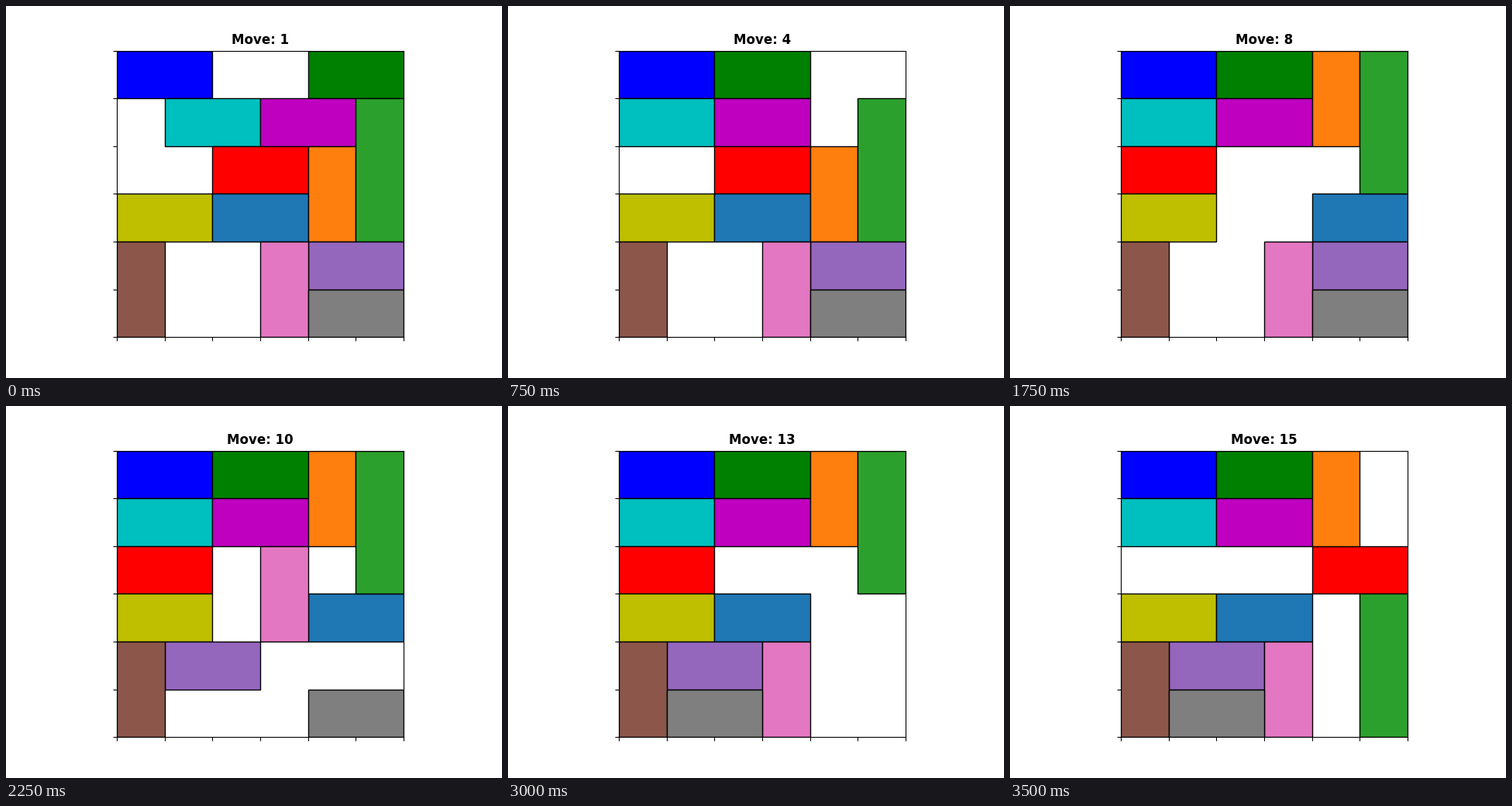
Write a matplotlib script that moves like this. It is 640 by 480 pixels and loops after 3.75 s.

```python
import matplotlib.pyplot as plt
from matplotlib.animation import FuncAnimation
from matplotlib.patches import Rectangle

SIZE = 6

# name: (column, row, width, height, colour), with row 0 at the top
BLOCKS = {
    "blue": (0, 0, 2, 1, "b"),
    "green": (4, 0, 2, 1, "g"),
    "cyan": (1, 1, 2, 1, "c"),
    "magenta": (3, 1, 2, 1, "m"),
    "red": (2, 2, 2, 1, "r"),
    "olive": (0, 3, 2, 1, "y"),
    "steel": (2, 3, 2, 1, "C0"),
    "orange": (4, 2, 1, 2, "C1"),
    "leaf": (5, 1, 1, 3, "C2"),
    "purple": (4, 4, 2, 1, "C4"),
    "brown": (0, 4, 1, 2, "C5"),
    "pink": (3, 4, 1, 2, "C6"),
    "gray": (4, 5, 2, 1, "C7"),
}

# each move slides one block to a new column and row
MOVES = [
    ("green", 2, 0),
    ("cyan", 0, 1),
    ("magenta", 2, 1),
    ("orange", 4, 0),
    ("leaf", 5, 0),
    ("steel", 4, 3),
    ("red", 0, 2),
    ("pink", 3, 2),
    ("purple", 1, 4),
    ("gray", 1, 5),
    ("pink", 3, 4),
    ("steel", 2, 3),
    ("leaf", 5, 3),
    ("red", 4, 2),
]

fig, ax = plt.subplots(figsize=(6.4, 4.8), dpi=100)
ax.set_aspect("equal")
ax.set(xlim=(0, SIZE), ylim=(SIZE, 0), xticks=range(SIZE + 1), yticks=range(SIZE + 1))
ax.tick_params(labelbottom=False, labelleft=False)
title = ax.set_title("", fontsize=12, fontweight="bold")

patches = {
    name: ax.add_patch(Rectangle((x, y), w, h, facecolor=color, edgecolor="k", linewidth=1))
    for name, (x, y, w, h, color) in BLOCKS.items()
}


def draw(step):
    places = {name: block[:2] for name, block in BLOCKS.items()}
    for name, x, y in MOVES[:step]:
        places[name] = (x, y)
    for name, xy in places.items():
        patches[name].set_xy(xy)
    title.set_text(f"Move: {step + 1}")
    return [*patches.values(), title]


anim = FuncAnimation(fig, draw, frames=len(MOVES) + 1, interval=250, repeat=True)
plt.show()
```
